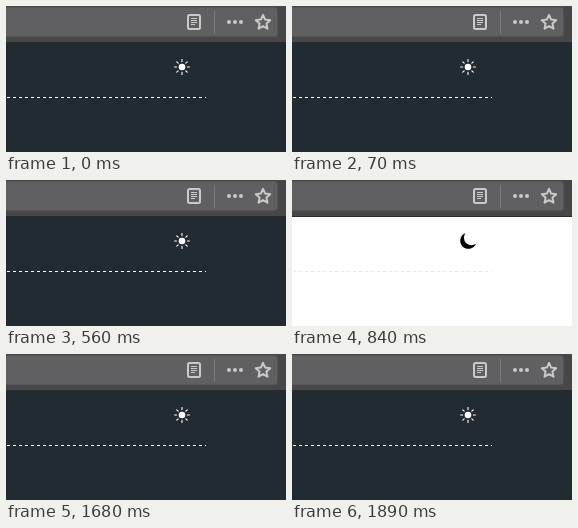
Animation, 280 px wide and 146 px high, one loop 2030 ms. Source, as an HTML page:

```html
<!DOCTYPE html>
<html lang="en">
<head>
<meta charset="utf-8">
<title>Theme toggle</title>
<style>
  html, body { margin: 0; width: 100%; height: 100%; overflow: hidden; background: #232b32; }
  svg { display: block; width: 280px; height: 146px; }
  .icon { fill: none; stroke: #c9c9ca; stroke-width: 2; stroke-linejoin: round; }
</style>
</head>
<body>
<svg viewBox="0 0 280 146">
  <rect id="page" y="37" width="280" height="109"/>
  <path id="rule" d="M1 91.5H200" stroke-dasharray="3 3"/>
  <g id="sun" transform="translate(176 61)" fill="#fff" stroke="#fff">
    <circle r="3.3" stroke="none"/>
    <g id="rays" stroke-width="1.1" stroke-linecap="round"></g>
  </g>
  <path id="moon" d="M173.5 53A8.2 8.2 0 1 0 184 63.8A7.6 7.6 0 0 1 173.5 53Z" fill="#000"/>

  <!-- browser toolbar -->
  <rect width="280" height="36" fill="#474749"/>
  <rect y="36" width="280" height="1" fill="#29292b"/>
  <rect x="-10" y="1.5" width="281.5" height="29" rx="3" fill="#606062" stroke="#555557"/>
  <path d="M208.5 5V28" stroke="#7b7b7d"/>
  <g class="icon">
    <rect x="182" y="9" width="12" height="14" rx="1.5"/>
    <path d="M185 12.5h6M185 14.5h6M185 16.5h6M185 18.5h4" stroke-width="1"/>
    <path id="star"/>
  </g>
  <g fill="#c9c9ca">
    <circle cx="223" cy="16" r="2"/><circle cx="229" cy="16" r="2"/><circle cx="235" cy="16" r="2"/>
  </g>
</svg>
<script>
  const LOOP = 2030, LIGHT_FROM = 840, LIGHT_TO = 1680;
  const $ = id => document.getElementById(id);
  const polar = (r, a) => `${r * Math.cos(a)} ${r * Math.sin(a)}`;

  let rays = '';
  for (let i = 0; i < 8; i++) {
    const a = i * Math.PI / 4;
    rays += `<path d="M${polar(5.4, a)}L${polar(7.4, a)}"/>`;
  }
  $('rays').innerHTML = rays;

  const points = Array.from({ length: 10 }, (_, i) =>
    polar(i % 2 ? 3.6 : 7.6, (i / 5 - 0.5) * Math.PI));
  $('star').setAttribute('d', `M${points.join('L')}Z`);
  $('star').setAttribute('transform', 'translate(257 16.5)');

  function draw(now) {
    const t = now % LOOP;
    const light = t >= LIGHT_FROM && t < LIGHT_TO;
    $('page').setAttribute('fill', light ? '#fff' : '#232b32');
    $('rule').setAttribute('stroke', light ? '#e6e6e6' : '#fff');
    $('sun').style.display = light ? 'none' : '';
    $('moon').style.display = light ? '' : 'none';
  }

  const start = performance.now();
  function tick() {
    draw(performance.now() - start);
    requestAnimationFrame(tick);
  }
  tick();
</script>
</body>
</html>
```
